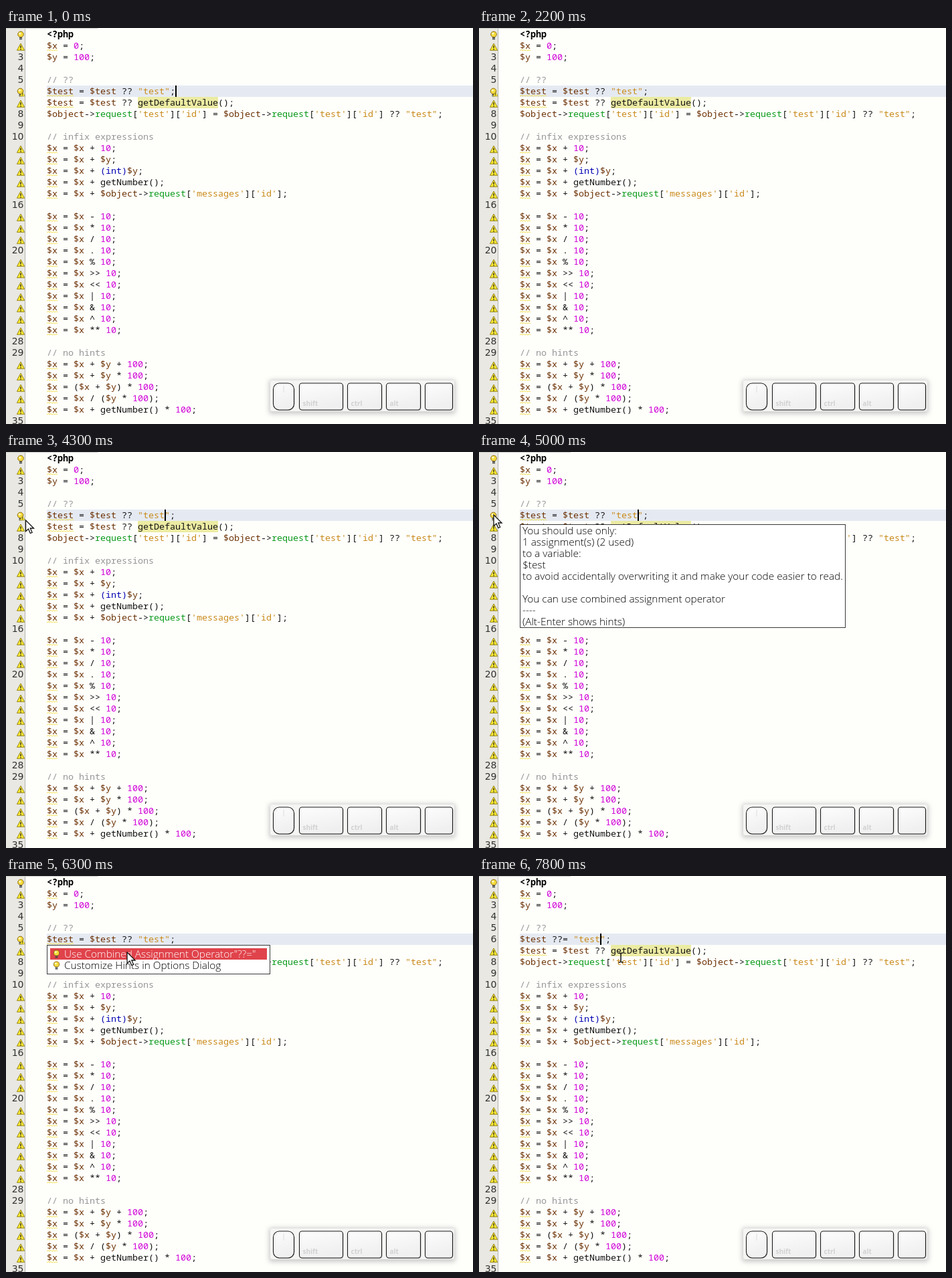
Recreate the animation shown at these times as an HTML page. Size 698x592 px, loop 8000 ms.

```html
<!DOCTYPE html>
<html lang="en">
<head>
<meta charset="utf-8">
<title>Editor hint</title>
<style>
  html, body { margin: 0; width: 100%; height: 100%; overflow: hidden; background: #fefefb; }
  svg { display: block; }
  text { white-space: pre; }
  .code { font: 13.3333px "Noto Sans Mono", "DejaVu Sans Mono", monospace; fill: #111; }
  .num { font: 14px "DejaVu Sans", sans-serif; fill: #333; text-anchor: end; }
  .ui { font: 300 15.35px "Open Sans", "Noto Sans", sans-serif; fill: #000; }
  .cap { font: bold 10px "Open Sans", sans-serif; fill: #d2d2d2; }
  .bold { font-weight: bold; fill: #000; }
  .comment { fill: #969696; }
  .variable { fill: #6d3206; }
  .string { fill: #c98a1b; }
  .cast { fill: #0000b4; }
  .number { fill: #d000d8; }
  .field { fill: #0b9a1b; }
  .wave { fill: none; stroke: #f2dc3c; stroke-width: 0.9; }
  .box { fill: #fff; stroke: #3a3a3a; }
</style>
</head>
<body>
<svg id="stage" width="698" height="592" viewBox="0 0 698 592">
  <defs>
    <linearGradient id="keyFill" x2="0.3" y2="1">
      <stop offset="0" stop-color="#fdfdfd"/>
      <stop offset="1" stop-color="#efefef"/>
    </linearGradient>
    <filter id="blur" x="-10%" y="-40%" width="120%" height="180%">
      <feGaussianBlur stdDeviation="3.5"/>
    </filter>
    <g id="bulb">
      <circle cy="-1.5" r="4.3" fill="#f6dc3c" stroke="#8a6a10"/>
      <circle cx="-1.2" cy="-2.8" r="1.5" fill="#fffbd0"/>
      <path d="M-2 3.5H2M-2 5.5H2" stroke="#444" stroke-width="1.4"/>
    </g>
    <g id="warn">
      <path d="M0-5L5.6 5.3H-5.6Z" fill="#fdeb30" stroke="#94841c" stroke-linejoin="round"/>
      <path d="M0-1.7V2M0 3V4.4" stroke="#222" stroke-width="1.4"/>
    </g>
  </defs>
</svg>
<script>
const stage = document.getElementById('stage');
const LOOP = 8000, LEFT = 61, PITCH = 17, CHAR = 8;

const source = [
  '<?php', '$x = 0;', '$y = 100;', '', '// ??',
  '$test = $test ?? "test";',
  '$test = $test ?? getDefaultValue();',
  "$object->request['test']['id'] = $object->request['test']['id'] ?? \"test\";",
  '', '// infix expressions',
  '$x = $x + 10;', '$x = $x + $y;', '$x = $x + (int)$y;', '$x = $x + getNumber();',
  "$x = $x + $object->request['messages']['id'];", '',
  ...['-', '*', '/', '.', '%', '>>', '<<', '|', '&', '^', '**'].map(op => `$x = $x ${op} 10;`),
  '', '// no hints',
  '$x = $x + $y + 100;', '$x = $x + $y * 100;', '$x = ($x + $y) * 100;',
  '$x = $x / ($y * 100);', '$x = $x + getNumber() * 100;', ''
];

function add(parent, tag, attrs = {}, content = '') {
  const node = document.createElementNS('http://www.w3.org/2000/svg', tag);
  for (const key in attrs) node.setAttribute(key, attrs[key]);
  node.textContent = content;
  return parent.appendChild(node);
}
const rect = (parent, x, y, width, height, attrs) =>
  add(parent, 'rect', { x, y, width, height, ...attrs });
const label = (parent, x, y, cls, content) =>
  add(parent, 'text', { x, y, class: cls }, content);
const icon = (parent, id, x, y, scale = 1) =>
  add(parent, 'use', { href: '#' + id, transform: `translate(${x} ${y}) scale(${scale})` });
const group = (parent = stage) => add(parent, 'g');
const show = (node, on) => { node.style.display = on ? '' : 'none'; };

const kinds = ['comment', 'variable', 'string', 'cast', 'number', 'field'];
const tokens = /(\/\/.*)|(\$\w+)|("[^"]*"|'[^']*')|(\(int\))|(\b\d+)|((?<=->)\w+)/g;

function codeLine(parent, row, line) {
  const node = label(parent, LEFT, row * PITCH - 3, row === 1 ? 'code bold' : 'code', '');
  let end = 0;
  for (const match of line.matchAll(tokens)) {
    const kind = kinds[match.slice(1).findIndex(Boolean)];
    node.append(line.slice(end, match.index));
    add(node, 'tspan', { class: kind }, match[0]);
    end = match.index + match[0].length;
  }
  node.append(line.slice(end));
}

function wave(parent, row, chars) {
  const d = `M${LEFT} ${row * PITCH}` + 'l2-1.5l2 1.5'.repeat(chars * CHAR / 4);
  add(parent, 'path', { d, class: 'wave' });
}

// Page, gutter and highlights
rect(stage, 0, 0, 698, 592, { fill: '#fefefb' });
rect(stage, LEFT, 86, 698 - LEFT, PITCH, { fill: '#e5eaf2' });
rect(stage, 197, 103, 120, PITCH, { fill: '#eceba3' });
rect(stage, 0, 0, 28, 592, { fill: '#e9e8e2' });
rect(stage, 28, 0, 1, 592, { fill: '#b5b5b0' });
rect(stage, 0, 0, 137, 1, { fill: '#cfcfcb' });

const before = group(), after = group();
const gutterNumber = (parent, row) => label(parent, 26.5, row * PITCH - 3, 'num', row);

source.forEach((line, i) => {
  const row = i + 1, y = row * PITCH - 6;
  const parent = row === 6 ? before : stage;
  const warned = /^\$(x|test) =/.test(line) && row !== 20;
  if (warned) wave(parent, row, line.indexOf(' '));
  codeLine(parent, row, line);
  if (row === 1) {
    icon(stage, 'bulb', 22, y);
  } else if (row === 6) {
    icon(before, 'bulb', 21.5, y);
    icon(before, 'warn', 24.5, y + 2.5, 0.65);
  } else if (warned) {
    icon(stage, 'warn', 22, y);
  } else {
    gutterNumber(stage, row);
  }
});
codeLine(after, 6, '$test ??= "test";');
gutterNumber(after, 6);

const caret = rect(stage, 0, 86, 2, PITCH, { fill: '#000' });

// Tooltip
const tip = group();
rect(tip, 61.5, 108.5, 486, 154, { class: 'box' });
[
  'You should use only:', '1 assignment(s) (2 used)', 'to a variable:', '$test',
  'to avoid accidentally overwriting it and make your code easier to read.', '',
  'You can use combined assignment operator', '----', '(Alt-Enter shows hints)'
].forEach((line, i) => label(tip, 65, 123 + i * PITCH, 'ui', line));

// Hint menu
const menu = group();
rect(menu, 61.5, 103.5, 333, 43, { class: 'box' });
rect(menu, 66, 108, 324, PITCH, { fill: '#e0434b' });
['Use Combined Assignment Operator"??="', 'Customize Hints in Options Dialog'].forEach((line, i) => {
  icon(menu, 'bulb', 75.5, 116.5 + i * PITCH, 0.95);
  label(menu, 87, 122 + i * PITCH, 'ui', line).style.fill = i ? '' : '#fff';
});

// Key monitor
rect(stage, 393, 526, 279, 51, { rx: 4, fill: '#bbb', opacity: 0.75, filter: 'url(#blur)' });
rect(stage, 395, 527, 275, 46, { rx: 3, fill: '#f5f5f3' });
function keyCap(x, width, name, rx = 4) {
  rect(stage, x + 1.5, 532, width, 40, { rx, fill: '#c4c4c4' });
  rect(stage, x + 0.5, 531, width, 40, { rx, fill: 'url(#keyFill)', stroke: '#1c1c1c', 'stroke-width': 1.1 });
  rect(stage, x + 3, 533, width - 5, 34, { rx: rx - 1, fill: 'none', stroke: '#f2f2f2' });
  label(stage, x + 5.5, 565, 'cap', name);
}
keyCap(399, 31, '', 9);
keyCap(438, 65, 'shift');
keyCap(510, 51, 'ctrl');
keyCap(568, 51, 'alt');
keyCap(626, 41, '');
add(stage, 'path', { d: 'M415 535V545', stroke: '#ddd' });
const press = add(stage, 'path', { d: 'M415 532V547H400V540Q400 532 408 532Z', fill: '#8a8a8a' });
const arrowKey = add(stage, 'path', {
  d: 'M656 551H638M644 545L638 551L644 557', fill: 'none', stroke: '#555', 'stroke-width': 2
});

// Mouse pointers
const arrow = add(stage, 'path', {
  d: 'M0 0V16.5L4 13L6.8 19.5L9.6 18.3L6.8 12H12Z', fill: '#fff', stroke: '#111', 'stroke-width': 1.3
});
const beam = add(stage, 'path', {
  d: 'M-3.5-7H-1.5L0-6L1.5-7H3.5M0-6V6M-3.5 7H-1.5L0 6L1.5 7H3.5',
  fill: 'none', stroke: '#111', 'stroke-width': 1.5
});

// Each step: start time, then its values
const caretSteps = [
  [0, 253], [300, 245], [600, 237],
  ...[900, 1200, 1500, 1800, 2200, 2500, 2800, 3000, 3300, 3600, 3900, 4300, 4500,
    4800, 5100, 5400, 5700, 6000, 6300, 6600, 6900, 7300].map((t, i) => [t, i % 2 ? 237 : 0]),
  [7500, 0], [7600, 181]
];
const mouseSteps = [
  [0], [3600, 516, 212], [3700, 430, 190], [3800, 290, 158], [3900, 150, 130],
  [4000, 62, 114], [4100, 26, 110], [4300, 29.5, 102], [4400, 18, 98], [4500, 15, 96],
  [4700, 18, 95], [4800, 22, 94], [5900, 56, 104], [6000, 108, 112], [6100, 154, 114],
  [6300, 181, 114], [6400, 186, 115], [6600, 192, 116], [6700, 200, 118],
  [6800, 207, 119], [6900, 211, 120], [7700, 212, 122]
];
const at = (steps, t) => steps.findLast(step => step[0] <= t);
const within = (t, from, to) => t >= from && t < to;

function draw(t) {
  const caretX = at(caretSteps, t)[1];
  show(caret, caretX);
  caret.setAttribute('x', caretX);

  const [, x, y] = at(mouseSteps, t);
  const isBeam = within(t, 3600, 4100) || t >= 7600;
  show(arrow, x && !isBeam);
  show(beam, x && isBeam);
  if (x) (isBeam ? beam : arrow).setAttribute('transform', `translate(${x} ${y})`);

  show(tip, within(t, 5000, 5100));
  show(menu, within(t, 5400, 7500));
  show(press, within(t, 5100, 5300) || within(t, 7300, 7500));
  show(arrowKey, within(t, 400, 1200));
  show(before, t < 7600);
  show(after, t >= 7600);
}

const start = performance.now();
function tick() {
  draw((performance.now() - start) % LOOP);
  requestAnimationFrame(tick);
}
tick();
</script>
</body>
</html>
```
